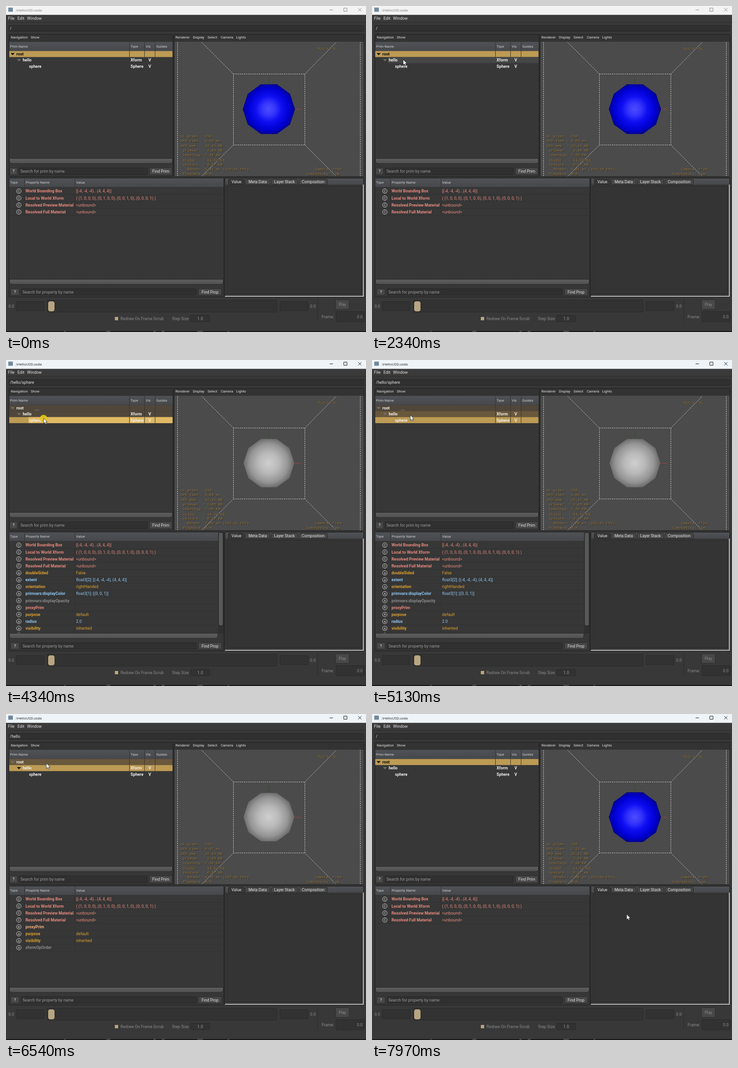
Write an HTML page that moves like this. It is 786 px wide and 712 px high and loops after 8000 ms.

```html
<!DOCTYPE html>
<html lang="en">
<head>
<meta charset="utf-8">
<title>Scene viewer</title>
<style>
html, body { margin: 0; width: 100%; height: 100%; overflow: hidden; background: #383838; }
svg { display: block; width: 100vw; height: 100vh; }
text { font-family: Roboto, sans-serif; white-space: pre; }
.hud text { font-family: "Liberation Mono", monospace; font-size: 8.03px; }
</style>
</head>
<body>
<svg id="stage" viewBox="0 0 786 712" xmlns="http://www.w3.org/2000/svg"></svg>
<script>
const LOOP = 8000;
const GOLD = '#bd9b54', BRIGHT = '#e0b964';
const RED = '#e98a7e', ORANGE = '#dba02f', BLUE = '#8fc6f0', DIM = '#8b8b8b', PEACH = '#efb07c';

const rect = (x, y, w, h, fill, more = '') =>
  `<rect x="${x}" y="${y}" width="${w}" height="${h}" fill="${fill}" ${more}/>`;
const box = (x, y, w, h, fill, edge = '#262626', r = 1) =>
  rect(x + .5, y + .5, w - 1, h - 1, fill, `stroke="${edge}" rx="${r}"`);
const path = (d, stroke, more = '') => `<path d="${d}" fill="none" stroke="${stroke}" ${more}/>`;
const text = (x, y, s, size = 8.8, fill = '#e4e4e4', more = '') =>
  `<text x="${x}" y="${y}" font-size="${size}" fill="${fill}" ${more}>${s.replace(/</g, '&lt;')}</text>`;
const bold = (x, y, s, fill) => text(x, y, s, 8.82, fill, 'font-weight="700"');
const mid = (x, y, s, size, fill) => text(x, y, s, size, fill, 'text-anchor="middle"');
const button = (x, y, w, h, s, fill = '#e4e4e4') =>
  box(x, y, w, h, '#484848', '#2c2c2c', 2) + mid(x + w / 2, y + h / 2 + 3, s, 8.7, fill);
const scrollBar = (y, end) =>
  path(`M7.5 ${y}H${end}V${y + 5}Q${end} ${y + 11} ${end - 6} ${y + 11}H13.5Q7.5 ${y + 11} 7.5 ${y + 5}Z`,
    '#262626', 'style="fill:url(#bar)"');
const stops = list => list.map(([o, c]) => `<stop offset="${o}" stop-color="${c}"/>`).join('');
const radial = (id, r, list) =>
  `<radialGradient id="${id}" gradientUnits="userSpaceOnUse" cx="573.5" cy="225" r="${r}">${stops(list)}</radialGradient>`;
const linear = (id, list) => `<linearGradient id="${id}" x2="0" y2="1">${stops(list)}</linearGradient>`;
const decagon = r => Array.from({ length: 10 }, (_, i) => {
  const a = i * Math.PI / 5;
  return `${(574 + r * Math.cos(a)).toFixed(1)},${(225.2 + r * Math.sin(a)).toFixed(1)}`;
}).join(' ');

const defs = `<defs>
  ${radial('blue', 57, [[0, '#4c4cff'], [.25, '#3636fb'], [.5, '#0e0ef2'], [.78, '#0000d4'], [.92, '#0000aa'], [1, '#000078']])}
  ${radial('gray', 56, [[0, '#cfcfcf'], [.4, '#b9b9b9'], [.75, '#959595'], [1, '#666']])}
  ${linear('head', [[0, '#4f5256'], [1, '#46484c']])}
  ${linear('bar', [[0, '#5e5e5e'], [1, '#515151']])}
  <clipPath id="list"><rect x="7" y="396" width="468" height="202"/></clipPath>
  <clipPath id="rootRow"><rect x="7" y="98" width="357" height="13"/></clipPath>
</defs>`;

function topBar() {
  return rect(0, 0, 786, 712, '#383838')
    + rect(0, 19, 786, 16, '#3a3a3a') + rect(0, 35, 786, 1, '#2b2b2b')
    + `<rect id="titleBar" width="786" height="19.3"/>`
    + rect(5, 3.5, 10, 9, '#71889a')
    + `<text id="title" x="20" y="11.6" font-size="7.7" style="font-family:'Open Sans',sans-serif">.\\HelloUSD.usda</text>`
    + `<path id="controls" fill="none" d="M706.5 8.5h7.5M737.5 4.5h7v7h-7zM769 4.7l7 7M776 4.7l-7 7"/>`
    + text(4.5, 30.2, 'File', 9) + text(25, 30.2, 'Edit', 9) + text(46, 30.2, 'Window', 9)
    + box(6, 42, 776, 14, '#303030') + `<text id="where" x="8.5" y="52" font-size="8.8" fill="#e4e4e4"/>`;
}

function treePanel() {
  return box(6, 61, 359, 312, '#373737', '#1e1e1e') + rect(7, 62, 357, 16, '#333')
    + text(10.5, 70.6, 'Navigation', 7.75) + text(54, 70.6, 'Show', 7.75)
    + rect(7, 78.5, 357, 19.5, 'url(#head)')
    + [[9, 'Prim Name'], [272, 'Type'], [305, 'Vis'], [328, 'Guides']]
      .map(([x, s]) => text(x, 90.6, s, 7.8, '#d0d0d0')).join('')
    + '<g id="tree"></g>'
    + path('M269.5 79V98M302.5 79V98M325.5 79V98', '#333')
    + scrollBar(333, 363.5)
    + button(8, 353, 17, 16, '?') + box(28, 353, 281, 16, '#303030')
    + text(31.5, 364, 'Search for prim by name', 8.9, '#9a9a9a') + button(313, 353, 50, 16, 'Find Prim');
}

function viewport() {
  const menu = [[370, 'Renderer'], [408, 'Display'], [440, 'Select'], [469, 'Camera'], [502.5, 'Lights']];
  return box(366, 61, 416, 312, '#333', '#1e1e1e') + rect(368, 78, 413, 294, '#4b4b4b')
    + menu.map(([x, s]) => text(x, 70.6, s, 7.75)).join('')
    + path('M374.5 79V372M773.5 79V372M496.5 148.5H652.5V303.5H496.5ZM496.5 148.5L427 79M652.5 148.5L721 79M496.5 303.5L427 372M652.5 303.5L721 372',
      '#dadada', 'stroke-dasharray="2.6 2"')
    + path('M573.5 155V171', '#2c4a2c') + path('M629 225.5H644', '#a04444')
    + '<polygon id="ball"/><g id="hud" class="hud"></g>';
}

function propPanel() {
  return box(6, 375, 470, 261, '#373737', '#1e1e1e') + rect(7, 376.5, 468, 18.5, 'url(#head)')
    + [[9, 'Type'], [43, 'Property Name'], [153, 'Value']]
      .map(([x, s]) => text(x, 388.4, s, 7.8, '#d0d0d0')).join('')
    + path('M40.5 377V395M150.5 377V395', '#333')
    + '<g id="props" clip-path="url(#list)"></g><g id="bars"></g>'
    + button(10, 617, 19, 15, '?') + box(33, 617, 383, 15, '#303030')
    + text(36, 628, 'Search for property by name', 8.88, '#9a9a9a') + button(420, 617, 51, 15, 'Find Prop');
}

function detailPanel() {
  const tabs = [[485, 36, 'Value'], [522, 55, 'Meta Data'], [579, 58, 'Layer Stack'], [639, 63, 'Composition']];
  return box(477, 375, 305, 261, '#373737', '#1e1e1e') + rect(479, 377, 301, 13, 'url(#head)')
    + tabs.map(([x, w, s], i) => box(x, 378, w, 12.5, i ? '#484848' : '#373737', '#242424') + mid(x + w / 2, 387.3, s, 8.7)).join('')
    + box(482, 393, 295, 236, '#343434', '#2a2a2a')
    + path('M478 634H780.3V390', '#ececec', 'stroke-width="1.6"');
}

function timeline() {
  const field = (x, y, w, h) => box(x, y, w, h, '#323232', '#292929');
  return text(5.5, 659.2, '0.0', 8.7, DIM) + text(664, 659.2, '0.0', 8.7, DIM)
    + field(22, 645, 62, 21) + field(89, 642, 503, 27) + field(598, 645, 62, 21)
    + box(91, 644, 16, 24, '#b8a582', '#232323', 5)
    + rect(680, 640, 1, 49, '#2a2a2a') + button(719, 641, 31, 22, 'Play', DIM)
    + text(689, 682, 'Frame:', 8.9, DIM) + field(720, 667, 63, 23)
    + text(778.5, 682, '0.0', 8.9, DIM, 'text-anchor="end"')
    + box(236.5, 678, 9.5, 9.5, '#b8a582', '#2b2b2b') + text(250, 686, 'Redraw On Frame Scrub', 8.85, DIM)
    + text(362.5, 686, 'Step Size', 8.85, DIM) + field(403, 675, 42, 15) + mid(424, 686, '1.0', 8.85, '#999')
    + rect(0, 710, 786, 2, '#161616')
    + [[127, 3], [219, 9], [322, 5], [340, 6], [418, 12], [484, 3]].map(([x, w]) => rect(x, 710, w, 1, '#77706a')).join('');
}

const stage = document.getElementById('stage');
stage.innerHTML = defs + topBar() + treePanel() + viewport() + propPanel() + detailPanel() + timeline()
  + '<circle id="click" r="8.3" fill="#e4c41e" fill-opacity=".9"/>'
  + '<path id="cursor" d="M0 0V11.6L2.7 9.2L4.5 13.1L6.5 12.2L4.8 8.5H8.4Z" fill="#fff" stroke="#1c1c1c" stroke-width=".8"/>';
const el = {};
stage.querySelectorAll('[id]').forEach(n => el[n.id] = n);

const prims = [['root', '', ''], ['hello', 'Xform', 'V'], ['sphere', 'Sphere', 'V']];
const ROW = 13.2, RIGHT = 363.5, rowTop = i => 98.3 + i * ROW;

function tree(sel, hover, ghost) {
  let out = '';
  prims.forEach(([name, type, vis], i) => {
    const y = rowTop(i), indent = 21 + i * 14, base = y + 9.8;
    const fill = i === sel ? GOLD : i < sel ? (hover === i ? '#6a583c' : '#50473a') : 'none';
    out += rect(7, y, RIGHT - 7, ROW, fill);
    if (hover === i && i >= sel) out += rect(indent, y, RIGHT - indent, ROW, i === sel ? BRIGHT : '#464646');
    if (fill !== 'none') out += path(`M269.5 ${y}v${ROW}M302.5 ${y}v${ROW}M325.5 ${y}v${ROW}`, '#3a3428');
    if (i < 2) {
      const x = 10 + i * 13.8;
      out += `<path d="M${x} ${y + 4.4}h9l-4.5 4.8z" fill="${i === sel ? '#151515' : '#6f6f6c'}"/>`;
    }
    const ink = i === sel && i === 0 ? '#0c0c0c' : '#f0f0f0';
    out += bold(22.6 + i * 13.8, base, name, ink) + bold(272, base, type, ink) + bold(311, base, vis, ink);
  });
  if (ghost) out += '<circle cx="67" cy="116" r="8.3" fill="#625b50" clip-path="url(#rootRow)"/>';
  return out;
}

const common = [
  ['C', 'World Bounding Box', '[(-4, -4, -4)...(4, 4, 4)]', RED],
  ['C', 'Local to World Xform', '( (1, 0, 0, 0), (0, 1, 0, 0), (0, 0, 1, 0), (0, 0, 0, 1) )', RED],
  ['C', 'Resolved Preview Material', '<unbound>', RED],
  ['C', 'Resolved Full Material', '<unbound>', RED]
];
const tail = proxy => [
  ['R', 'proxyPrim', '', proxy],
  ['A', 'purpose', 'default', ORANGE]
];
const last = [['A', 'visibility', 'inherited', ORANGE], ['A', 'xformOpOrder', '', DIM]];
const propSets = [
  common,
  [...common, ...tail(PEACH), ...last],
  [...common,
    ['A', 'doubleSided', 'False', ORANGE],
    ['A', 'extent', 'float3[2]: [(-4, -4, -4), (4, 4, 4)]', BLUE],
    ['A', 'orientation', 'rightHanded', ORANGE],
    ['A', 'primvars:displayColor', 'float3[1]: [(0, 0, 1)]', BLUE],
    ['A', 'primvars:displayOpacity', '', DIM],
    ...tail(RED), ['A', 'radius', '2.0', BLUE], ...last]
];

function props(sel) {
  return propSets[sel].map(([kind, name, value, ink], i) => {
    const y = 404.3 + i * 15.15;
    return rect(7, y + 7.2, 468, .7, '#303030') + rect(40, y - 7.5, 1, 15, '#313131') + rect(150, y - 7.5, 1, 15, '#313131')
      + `<circle cx="28" cy="${y}" r="5" fill="none" stroke="#dedede" stroke-width=".9"/>`
      + mid(28, y + 2.6, kind, 7.2) + bold(42.5, y + 3.1, name, ink) + text(153, y + 3.1, value, 8.88, ink);
  }).join('');
}

const bars = sel => scrollBar(597, sel === 2 ? 462.5 : 474.5)
  + (sel === 2 ? rect(463, 377, 12, 220, '#2f2f2f') + box(463.5, 376, 11, 205, '#585858', '#222', 4) : '');

function hud(gpu, frame) {
  const lines = ['GL prims : 210', `GPU time : ${gpu} ms`, 'GPU mem  : 12.41 MB', ' primvar  : 1.66 KB',
    ' topology: 7.38 KB', ' shader   : 44.66 KB', ' texture  : 6.17 KB', `   Render: ${frame} FPS)`, ' Playback: N/A'];
  const items = lines.map((s, i) => [381.5, 287.2 + i * 10.27, s]);
  items.push([680.5, 94.5, 'Hydra: GL'], [675, 359.1, 'Camera: Free'], [656, 369.3, 'Complexity: Low']);
  return items.map(([x, y, s]) => text(x + .8, y + .8, s, 8.03, '#1f1c16') + text(x, y, s, 8.03, '#9c7c44')).join('');
}

// Each move: start, end, number of steps, waypoints evenly spaced over the steps.
const moves = [
  [240, 520, 5, [[770, 797], [700, 277]]],
  [850, 1130, 5, [[700, 277], [520, 217], [360, 180], [298, 169], [304, 169]]],
  [1730, 2340, 10, [[304, 169], [210, 143], [100, 122], [39, 116], [60, 117], [68, 117]]],
  [3800, 4010, 4, [[68, 117], [70, 118], [74, 122], [79, 126], [82, 127]]],
  [4930, 5200, 4, [[82, 127], [84, 118]]],
  [6050, 6540, 8, [[84, 118], [87, 112], [88, 107.5]]],
  [7420, 7970, 9, [[88, 107.5], [150, 145], [340, 280], [500, 395], [556, 437.5]]]
];
const clicks = [[2940, 3140, 67.5, 117], [4270, 4400, 82, 128], [5530, 5790, 84, 118], [6760, 6890, 88, 108]];
// Each state: start, selected row, path, timings.
const states = [
  [0, 0, '/', '1.03', '5.61 ms (178.16'],
  [3010, 1, '/hello', '2.85', '7.08 ms (141.16'],
  [4340, 2, '/hello/sphere', '1.64', '7.58 ms (131.91'],
  [5530, 1, '/hello', '0.97', '6.76 ms (147.86'],
  [6760, 0, '/', '2.33', '6.49 ms (153.99']
];

function cursorAt(t) {
  const move = moves.filter(m => t >= m[0]).pop();
  if (!move) return null;
  const [start, end, steps, pts] = move;
  const done = Math.floor((t - start) / (end - start) * (steps - 1) + 1e-6) + 1;
  const u = Math.min(1, done / steps) * (pts.length - 1);
  const i = Math.min(pts.length - 2, Math.floor(u)), k = u - i;
  return pts[i].map((v, j) => v + (pts[i + 1][j] - v) * k);
}

let shown = null, treeKey = '';
function draw(t) {
  const state = states.filter(s => t >= s[0]).pop();
  const [, sel, where, gpu, frame] = state;
  const active = t >= 2940, pos = cursorAt(t);
  if (state !== shown) {
    shown = state;
    el.where.textContent = where;
    el.props.innerHTML = props(sel);
    el.bars.innerHTML = bars(sel);
    el.hud.innerHTML = hud(gpu, frame);
    el.ball.setAttribute('points', decagon(sel ? 55.5 : 57));
    el.ball.setAttribute('fill', sel ? 'url(#gray)' : 'url(#blue)');
  }
  el.titleBar.setAttribute('fill', active ? '#eff4f9' : '#f3f3f3');
  el.title.setAttribute('fill', active ? '#191919' : '#777');
  el.controls.setAttribute('stroke', active ? '#1a1a1a' : '#858585');

  let hover = -1;
  if (pos && pos[0] < RIGHT) hover = Math.floor((pos[1] - rowTop(0)) / ROW);
  const ghost = t >= 3140 && t < 6050;
  const key = [sel, hover, ghost].join();
  if (key !== treeKey) el.tree.innerHTML = tree(sel, hover, ghost);
  treeKey = key;

  const click = clicks.find(c => t >= c[0] && t < c[1]);
  el.click.setAttribute('visibility', click ? 'visible' : 'hidden');
  if (click) el.click.setAttribute('transform', `translate(${click[2]} ${click[3]})`);
  el.cursor.setAttribute('visibility', pos ? 'visible' : 'hidden');
  if (pos) el.cursor.setAttribute('transform', `translate(${pos[0]} ${pos[1]})`);
}

const begin = performance.now();
function tick() {
  draw((performance.now() - begin) % LOOP);
  requestAnimationFrame(tick);
}
tick();
</script>
</body>
</html>
```
